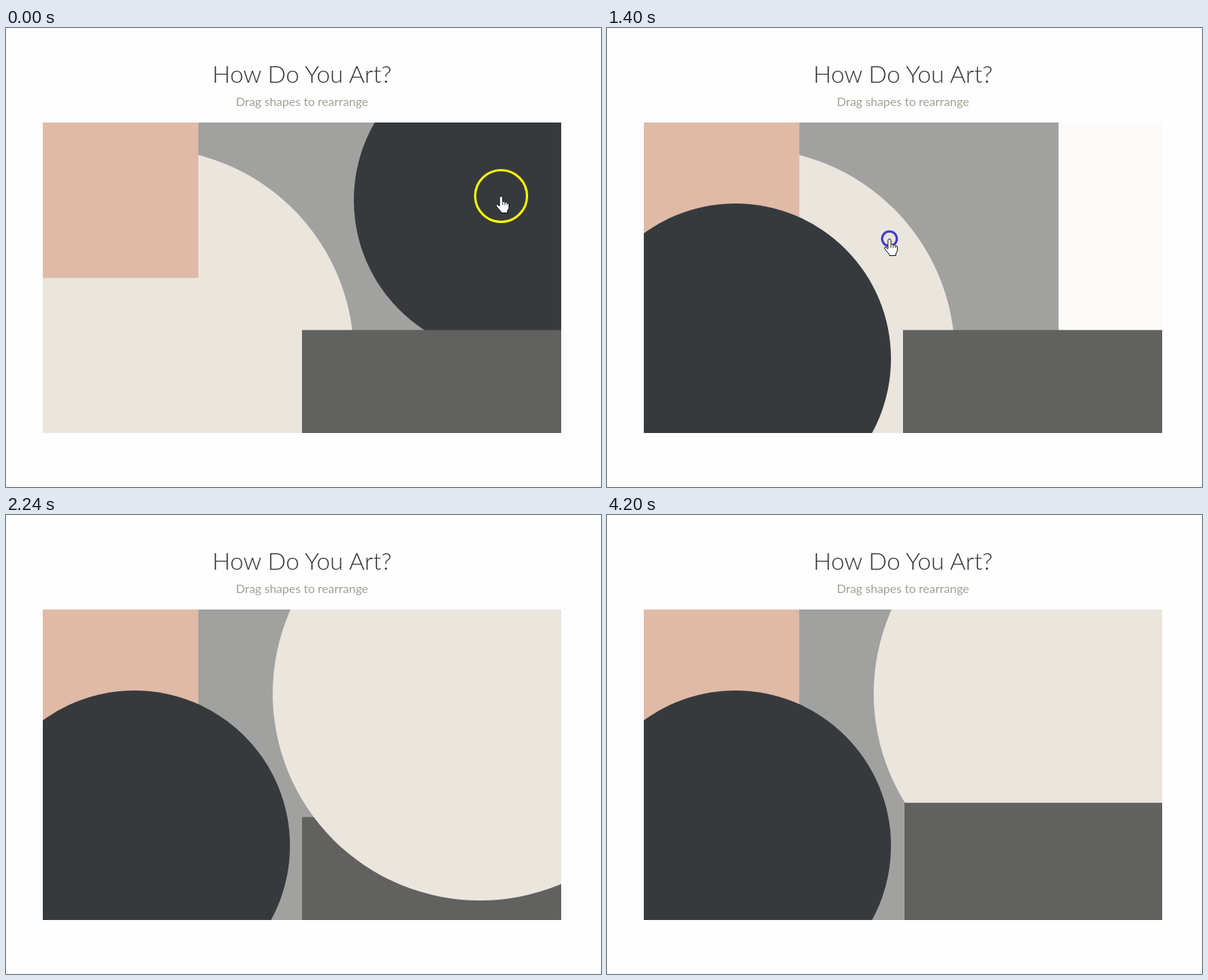
Animation, 792 px wide and 612 px high, one loop 5.13 s. Source, as an HTML page:

```html
<!DOCTYPE html>
<html lang="en">
<head>
<meta charset="utf-8">
<title>Shape arranger</title>
<style>
  html, body { margin: 0; width: 100%; height: 100%; overflow: hidden; background: #fefefe; }
  svg { display: block; width: 792px; height: 612px; }
  text { font-family: Lato, sans-serif; text-anchor: middle; }
  .title { font-size: 32px; font-weight: 300; fill: #333; }
  .hint { font-size: 16px; fill: #a0a093; }
</style>
</head>
<body>
<svg viewBox="0 0 792 612">
  <clipPath id="frame"><rect x="49" y="126" width="690" height="414"/></clipPath>
  <text class="title" x="394" y="73">How Do You Art?</text>
  <text class="hint" x="394" y="104">Drag shapes to rearrange</text>
  <g clip-path="url(#frame)">
    <rect x="49" y="126" width="690" height="414" fill="#fbfaf9"/>
    <g id="shapes">
      <rect x="256" y="126" width="345" height="414" fill="#a1a1a0"/>
      <circle id="cream" cx="187" cy="436.5" r="276" fill="#eae6de"/>
      <rect x="49" y="126" width="207" height="207.3" fill="#dfbaa7"/>
      <circle id="dark" cx="670" cy="229.5" r="207" fill="#373a3c"/>
      <rect id="slab" x="394" y="402.7" width="345" height="207" fill="#61615f"/>
    </g>
  </g>
  <g id="cursor">
    <circle id="halo" r="34.5" fill="none" stroke="#ffff0a" stroke-width="3"/>
    <circle id="press" r="9.8" fill="none" stroke-width="3" stroke-opacity=".8"/>
    <path d="M-2 1.5Q0-1.5 2 1.5V7.5Q4 6.5 5 8.5Q7 7.5 8 9.5Q10 9 10.5 11V16L8.5 20V22.5H0V21L-6 14Q-7.5 11-5 11L-2 13.5Z"
      fill="#fff" stroke="#111" stroke-linejoin="round"/>
    <path d="M2 7.5V12M5 8.5V12M8 9.5V12" fill="none" stroke="#111" stroke-width=".9"/>
  </g>
</svg>
<script>
const LOOP = 5130, STEP = 140, LAST = 4200;

// Pointer path: time in ms, x, y
const path = [
  [0, 659, 224], [140, 621, 233], [280, 567, 252.5], [420, 389, 341],
  [560, 240, 405], [700, 118, 450], [840, 68, 464], [980, 68, 464],
  [1120, 135, 420], [1260, 300, 315], [1400, 376, 281], [1540, 510, 248],
  [1680, 722, 195.5], [1820, 802, 105], [1960, 820, 82.5], [2240, 835, 110],
  [2380, 790, 190], [2660, 560, 400], [2800, 470, 465], [2940, 439, 480],
  [3080, 439, 473], [3220, 440, 464], [3360, 441, 461], [3640, 441, 461],
  [3780, 435, 490], [3920, 420, 545], [4060, 405, 595], [4200, 395, 660]
];
const drags = [
  { id: "dark", start: 280, end: 980 },
  { id: "cream", start: 1400, end: 1960 },
  { id: "slab", start: 2940, end: 3500 }
];

const byId = id => document.getElementById(id);
const clamp = (v, lo, hi) => Math.min(hi, Math.max(lo, v));
const shapes = byId("shapes");
const baseOrder = [...shapes.children];
const move = (el, x, y) => el.setAttribute("transform", `translate(${x} ${y})`);
const show = (el, on) => el.setAttribute("visibility", on ? "visible" : "hidden");

function pointer(t) {
  const i = Math.max(1, path.findIndex(key => key[0] >= t));
  const [t0, x0, y0] = path[i - 1], [t1, x1, y1] = path[i];
  const k = (t - t0) / (t1 - t0);
  return [x0 + (x1 - x0) * k, y0 + (y1 - y0) * k];
}

function render(t) {
  // Each dragged shape follows the pointer and ends up on top
  const order = [...baseOrder];
  for (const { id, start, end } of drags) {
    const el = byId(id);
    const [x0, y0] = pointer(start), [x, y] = pointer(clamp(t, start, end));
    move(el, x - x0, y - y0);
    if (t > start) order.push(...order.splice(order.indexOf(el), 1));
  }
  shapes.append(...order);

  move(byId("cursor"), ...pointer(t));
  show(byId("halo"), t < 980);
  const held = drags.find(d => t >= d.start && t < d.end);
  show(byId("press"), held);
  if (held) {
    const fade = clamp((t - held.start - 140) / 140, 0, 1);
    byId("press").setAttribute("stroke", `rgb(20 20 ${200 - 85 * fade})`);
  }
}

const begin = performance.now();
let shown = -1;
function tick() {
  const time = (performance.now() - begin) % LOOP;
  const t = Math.min(LAST, Math.floor(time / STEP) * STEP);
  if (t !== shown) render(shown = t);
  requestAnimationFrame(tick);
}
tick();
</script>
</body>
</html>
```
